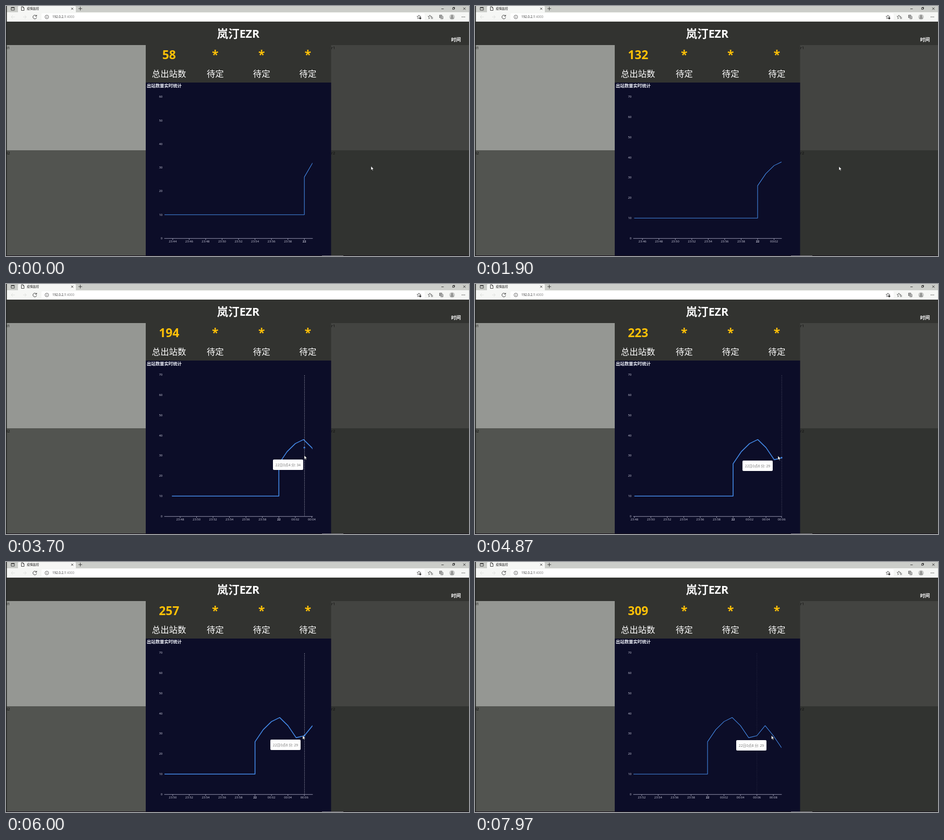
An HTML page for the animation above (8 s loop, 888x480 px).

```html
<!DOCTYPE html>
<html lang="zh-CN">
<head>
<meta charset="utf-8">
<title>疫情监控</title>
<style>
  html, body { margin: 0; width: 100%; height: 100%; overflow: hidden; background: #323330; }
  svg { display: block; width: 888px; height: 480px; }
  text { font-family: "Noto Sans", "Noto Sans CJK SC", "Noto Sans CJK", sans-serif; }
  .mid { text-anchor: middle; }
  .head { font-size: 21.4px; font-weight: 700; fill: #fff; }
  .big { font-size: 22.8px; font-weight: 700; fill: #ffc107; }
  .name { font-size: 16.4px; fill: #fff; }
  .tag { font-size: 7.6px; fill: #111; }
  .axis text { font-size: 5.9px; fill: #c3c3d4; }
  .axis line { stroke: #b9b8ce; stroke-width: .8; }
  .icon { fill: none; stroke: #333; stroke-width: .9; }
  .pale { stroke: #dcdddb; }
</style>
</head>
<body>
<svg viewBox="0 0 888 480">
  <defs>
    <clipPath id="plot"><rect x="303.5" y="170" width="284.3" height="280"/></clipPath>
  </defs>

  <!-- browser bar -->
  <rect width="888" height="12.5" fill="#cbcdc9"/>
  <rect y="12" width="888" height="18.5" fill="#f6f7f5"/>
  <path d="M23 12.5V2q0-2 2-2H132q2 0 2 2V12.5z" fill="#f6f7f5"/>
  <rect x="68" y="14" width="735" height="14" rx="2" fill="#fff"/>
  <g class="icon">
    <path d="M10 2.5h6v5.5h-6zM10 3.5h6"/>
    <path d="M29.5 1.5h3.2l2 2v5h-5.2zM32.7 1.5v2h2"/>
    <path d="M125 3.2l4 4m0-4l-4 4M139 5h7m-3.5-3.5v7"/>
    <path d="M835 5.5h4.5M856.5 3.5h3v3h-3zM857.5 3.5v-1h3v3h-1M877 2.8l4.4 4.4m0-4.4l-4.4 4.4"/>
    <path class="pale" d="M17 21h-7m3-3l-3 3 3 3M33 21h6m-3-3l3 3-3 3"/>
    <path d="M58.3 19.2a3.6 3.6 0 1 0 .5 2.6M58.8 17v2.6h-2.6"/>
    <circle cx="78.3" cy="21" r="3.5" stroke-width=".7"/>
    <path d="M78.3 20.5v2.3M78.3 18.8v.8" stroke-width=".8"/>
    <path id="star" d="M792 17.3l1.1 2.5 2.7.2-2.1 1.8.6 2.6-2.3-1.4-2.3 1.4.6-2.6-2.1-1.8 2.7-.2z" stroke-width=".7"/>
    <path d="M813 17.5l1 2.3 2.6.2-2 1.8M813 17.5l-1 2.3-2.6.2 2 1.8-.5 2.6 2-1.3M815 22h4m-4 2h4" stroke-width=".7"/>
    <path d="M831.5 17.5h4.5v5h-4.5zM833.5 24.5h4.5v-5M833.7 18.5v3m-1.5-1.5h3" stroke-width=".8"/>
  </g>
  <circle cx="794.5" cy="23.5" r="2" fill="#444"/>
  <circle cx="855.5" cy="21" r="5.2" fill="#c5c6c4"/>
  <circle cx="855.5" cy="19.4" r="1.8" fill="#858684"/>
  <path d="M852.2 24.2q.3-2.7 3.3-2.7t3.3 2.7z" fill="#858684"/>
  <g fill="#333"><circle cx="874.7" cy="21" r=".7"/><circle cx="877.2" cy="21" r=".7"/><circle cx="879.7" cy="21" r=".7"/></g>
  <text x="40" y="7.2" font-size="5.8" fill="#111">疫情监控</text>
  <text x="89" y="23.3" font-size="6.2" fill="#333">192.0.2.1<tspan fill="#888">:4000</tspan></text>

  <!-- page panels -->
  <rect y="30" width="888" height="450" fill="#323330"/>
  <rect y="75" width="268" height="202" fill="#959793"/>
  <rect y="277" width="268" height="203" fill="#525450"/>
  <rect x="623.5" y="75" width="264.5" height="202" fill="#434441"/>
  <rect x="623.5" y="277" width="264.5" height="203" fill="#313330"/>
  <rect x="268" y="147" width="355.5" height="333" fill="#0c0d28"/>
  <rect width="1.6" height="480" fill="#242523"/>
  <rect y="479" width="888" height="1" fill="#17101a"/>
  <rect x="606" y="479" width="41" height="1" fill="#77737c"/>

  <text class="head mid" x="445.5" y="61.3">岚汀EZR</text>
  <text x="853.7" y="68.2" font-size="9.3" font-weight="700" fill="#fff">时间</text>
  <text class="tag" x="1.3" y="82.8">l1</text>
  <text class="tag" x="1.3" y="284.8">l2</text>
  <text class="tag" x="623.8" y="82.8">r1</text>
  <text class="tag" x="623.8" y="284.8">r2</text>

  <text class="big mid" id="total" x="312.7" y="102"></text>
  <text class="big mid" x="401.3" y="102">*</text>
  <text class="big mid" x="490.2" y="102">*</text>
  <text class="big mid" x="579" y="102">*</text>
  <text class="name mid" x="312.6" y="136">总出站数</text>
  <text class="name mid" x="401.3" y="136">待定</text>
  <text class="name mid" x="490.2" y="136">待定</text>
  <text class="name mid" x="579" y="136">待定</text>
  <text x="270" y="156.3" font-size="8.4" font-weight="700" fill="#eef1fa">出站数量实时统计</text>

  <!-- chart -->
  <g class="axis">
    <line x1="303.5" x2="588.4" y1="446.3" y2="446.3"/>
    <g id="xAxis"></g>
    <g id="yAxis" text-anchor="end"></g>
  </g>
  <polyline id="line" clip-path="url(#plot)" fill="none" stroke="#448ae8" stroke-linejoin="bevel"/>
  <line id="pointer" y1="175" y2="446" stroke="#c9c9d8" stroke-width=".8" stroke-dasharray="2 1.3"/>
  <circle id="dot" r="1.6" fill="#448ae8"/>
  <g id="tip">
    <rect width="58" height="20" rx="2" fill="#fff"/>
    <text class="mid" id="tipText" x="29" y="12.5" font-size="6.7" fill="#777"></text>
  </g>
  <path id="cursor" d="M0 0V7.6L1.8 6 3 8.8 4.2 8.3 3 5.6H5.3z" fill="#fff" stroke="#111" stroke-width=".5"/>
</svg>

<script>
const LOOP = 8000, LEFT = 304, RIGHT = 588, BASE = 446, TOP = 174.5, SPAN = 18;
const STEP = (RIGHT - LEFT) / SPAN;
// counts per minute from midnight; before that the series is flat
const counts = [26, 32, 36, 38, 34, 28, 29, 34, 29, 23];
const FLAT = 10;
const updates = [560, 1540, 2520, 3555, 4520, 5540, 6560, 7460];
const DURATION = 500;
const HOVER = 3330, BLUR = 6560;

// time, x, y
const mousePath = [
  [0, 700, 307.5], [1500, 700, 307.5], [1700, 698, 308], [2900, 698, 308],
  [3300, 572, 329], [3900, 572, 329], [4700, 581, 330], [4900, 581, 330],
  [5200, 569, 333], [8000, 568.5, 333]
];
const tipPath = [
  [3330, 512, 337], [4500, 512, 337], [4800, 513, 339], [4950, 513, 339],
  [5400, 507, 341], [7460, 507, 341], [7800, 501, 342]
];

const $ = id => document.getElementById(id);
const lerp = (a, b, p) => a + (b - a) * p;
const easeInOut = p => p < .5 ? 4 * p ** 3 : 1 - (2 - 2 * p) ** 3 / 2;
const set = (el, attrs) => { for (const k in attrs) el.setAttribute(k, attrs[k]); };

function add(parent, tag, attrs) {
  const el = document.createElementNS('http://www.w3.org/2000/svg', tag);
  set(el, attrs);
  return parent.appendChild(el);
}

function along(path, t) {
  if (t <= path[0][0]) return path[0].slice(1);
  for (let i = 1; i < path.length; i++) {
    const [t0, x0, y0] = path[i - 1], [t1, x1, y1] = path[i];
    if (t <= t1) {
      const p = easeInOut((t - t0) / (t1 - t0));
      return [lerp(x0, x1, p), lerp(y0, y1, p)];
    }
  }
  return path[path.length - 1].slice(1);
}

function clockLabel(m) {
  if (m === 0) return '22';
  const pad = n => String(n).padStart(2, '0');
  return m < 0 ? '23:' + pad(60 + m) : '00:' + pad(m);
}

const xTicks = [];
for (let m = -16; m <= 8; m += 2) {
  const g = add($('xAxis'), 'g', {});
  add(g, 'line', { y1: 446.3, y2: 449.2 });
  const label = add(g, 'text', { class: 'mid', y: 454.2, 'font-weight': m ? 400 : 700 });
  label.textContent = clockLabel(m);
  xTicks.push({ m, g });
}

const yLabels = [];
for (let v = 0; v <= 70; v += 10) {
  const el = add($('yAxis'), 'text', { x: 300.2 });
  el.textContent = v;
  yLabels.push({ v, el });
}

function draw(t) {
  const done = updates.filter(u => u <= t).length;
  const end = 1 + done;
  const p = done ? easeInOut(Math.min(1, (t - updates[done - 1]) / DURATION)) : 1;
  const shift = (1 - p) * STEP;
  const x = m => RIGHT - (end - m) * STEP + shift;
  const unit = max => (BASE - TOP) / max;
  const scale = done === 0 ? unit(60) : done === 1 ? lerp(unit(60), unit(70), p) : unit(70);
  const y = v => BASE - v * scale;

  $('total').textContent = counts.slice(0, end + 1).reduce((a, b) => a + b, 0);

  // a newly added tick appears at its resting place; the others slide
  for (const { m, g } of xTicks) {
    const shown = m <= end && m >= end - SPAN;
    set(g, { visibility: shown ? 'visible' : 'hidden', transform: `translate(${m === end ? RIGHT : x(m)})` });
  }
  for (const { v, el } of yLabels) {
    const isNew = v === 70;
    set(el, { y: (isNew ? TOP : y(v)) + 1.8, visibility: isNew && !done ? 'hidden' : 'visible' });
  }

  const points = [[x(end - SPAN), y(FLAT)], [x(0), y(FLAT)]];
  for (let m = 0; m <= end; m++) points.push([x(m), y(counts[m])]);
  const hover = t >= HOVER, active = hover && t < BLUR;
  set($('line'), { points: points.join(' '), 'stroke-width': active ? 1.6 : 1.1 });

  const [mx, my] = along(mousePath, t);
  set($('cursor'), { transform: `translate(${mx} ${my})` });

  const near = Math.min(end, end - Math.round((RIGHT - mx) / STEP));
  const rest = RIGHT - (end - near) * STEP;
  set($('pointer'), {
    visibility: hover ? 'visible' : 'hidden',
    transform: `translate(${active ? rest + .3 : x(6)})`,
    opacity: !active ? .12 : near === end ? .3 : .75
  });
  set($('dot'), { visibility: active ? 'visible' : 'hidden', cx: rest, cy: y(counts[near] || 0) });

  const [tx, ty] = along(tipPath, t);
  set($('tip'), { visibility: hover ? 'visible' : 'hidden', transform: `translate(${tx} ${ty})` });
  if (hover) $('tipText').textContent = `22日0点${near} 分: ${counts[near]}`;
}

const start = performance.now();
function frame() {
  draw((performance.now() - start) % LOOP);
  requestAnimationFrame(frame);
}
frame();
</script>
</body>
</html>
```
